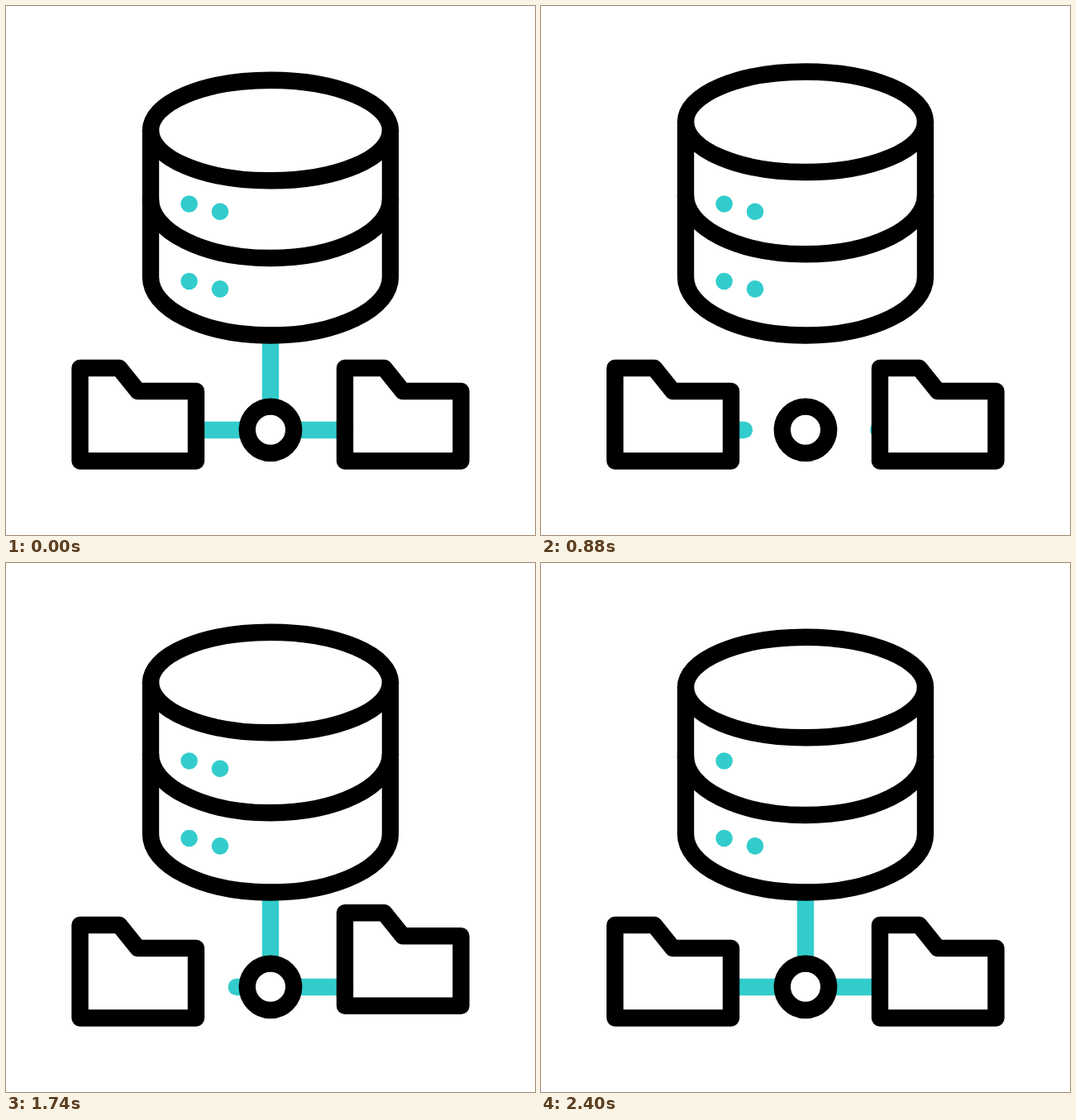
These frames come from a looping animation (640 px wide and 640 px high, 2.42 s). An HTML page:

```html
<!DOCTYPE html>
<html>
<head>
<meta charset="utf-8">
<style>
  html, body { margin: 0; width: 100%; height: 100%; overflow: hidden; background: #fff; }
  svg { display: block; width: 100%; height: 100%; }
  .link { fill: none; stroke: #3cc; stroke-linecap: round; }
  .ink { fill: none; stroke: #000; stroke-linejoin: round; stroke-linecap: round; }
  .dots { fill: #3cc; stroke: none; }
</style>
</head>
<body>
<svg viewBox="0 0 640 640" stroke-width="20.4">
  <defs>
    <path id="folder" d="M89.5 438H137L159.5 466H230V550.5H89.5Z"/>
  </defs>
  <g class="link">
    <path id="down"/>
    <path id="right"/>
    <path id="left"/>
  </g>
  <g class="ink">
    <use id="leftFolder" href="#folder"/>
    <use id="rightFolder" href="#folder"/>
    <circle id="hub" cx="320" cy="512.8" fill="#fff"/>
    <path id="body"/>
    <path id="band" d="M175 234A145 71 0 0 0 465 234"/>
    <ellipse id="lid" cx="320" cy="150.5" rx="145" ry="60.8"/>
  </g>
  <g class="dots">
    <circle cx="221.6" cy="239.5" r="10.3"/>
    <circle id="blinker" cx="259" cy="248.8" r="10.3"/>
    <circle cx="221.6" cy="333" r="10.3"/>
    <circle cx="259" cy="342.4" r="10.3"/>
  </g>
</svg>
<script>
const LOOP = 2420;
const el = id => document.getElementById(id);
const ramp = (t, from, to) => Math.min(1, Math.max(0, (t - from) / (to - from)));
const smooth = u => u * u * (3 - 2 * u);

// Eased rise and fall between two times
function bump(t, from, to) {
  return smooth(1 - Math.abs(2 * ramp(t, from, to) - 1));
}

// Line that is wiped away from its start, then drawn again from its start
function link(id, t, a, b, wipe, grow, command, fixed) {
  const at = u => a + (b - a) * u;
  const regrowing = t >= grow[0];
  const start = regrowing ? a : at(ramp(t, ...wipe));
  const end = regrowing ? at(ramp(t, ...grow)) : b;
  const origin = command === 'V' ? `${fixed} ${start}` : `${start} ${fixed}`;
  el(id).setAttribute('d', `M${origin}${command}${end}`);
}

function move(id, x, y) {
  el(id).setAttribute('transform', `translate(${x} ${y})`);
}

function draw(t) {
  const lift = -12 * bump(t, 0, 2320);
  const top = 150.5 + lift;
  move('lid', 0, lift);
  move('band', 0, lift * 0.46);
  el('body').setAttribute('d', `M175 ${top}V328A145 70.5 0 0 0 465 328V${top}`);

  link('down', t, 398, 485, [20, 600], [1000, 1490], 'V', 320);
  link('right', t, 348, 410, [344, 896], [1350, 1720], 'H', 513);
  link('left', t, 292, 230, [470, 1022], [1650, 2081], 'H', 513);

  el('hub').setAttribute('r', 28.2 + 5 * bump(t, 1220, 1600));
  move('rightFolder', 320.5, -16.8 * bump(t, 1565, 2015));
  move('leftFolder', 0, -16.8 * bump(t, 1940, 2390));
  el('blinker').setAttribute('visibility', t >= 2360 ? 'hidden' : 'visible');
}

function tick() {
  draw(performance.now() % LOOP);
  requestAnimationFrame(tick);
}
tick();
</script>
</body>
</html>
```
